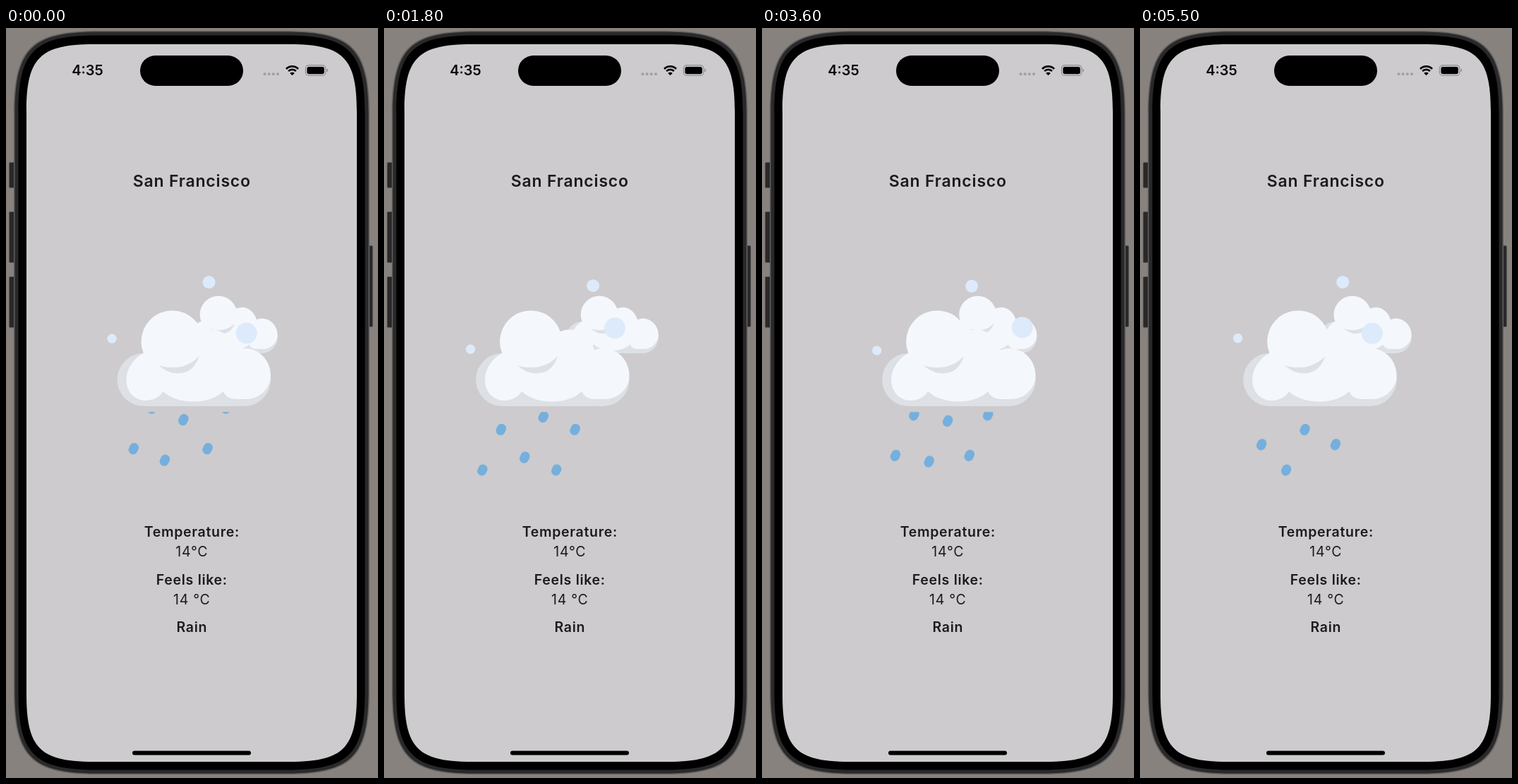
Write an HTML page that moves like this. It is 527 px wide and 1063 px high and loops after 5600 ms.

```html
<!DOCTYPE html>
<html lang="en">
<head>
<meta charset="utf-8">
<title>Weather</title>
<style>
  html, body { margin: 0; width: 100%; height: 100%; overflow: hidden; background: #88827e; }
  svg { display: block; width: 527px; height: 1063px; }
  text { font-family: Inter, "Liberation Sans", sans-serif; font-size: 19.5px; fill: #1c1a1e; text-anchor: middle; letter-spacing: .7px; }
  .b { font-weight: 600; }
  .rain { fill: none; stroke: #75afde; stroke-width: 13; stroke-linecap: round; }
</style>
</head>
<body>
<svg viewBox="0 0 527 1063">
  <defs>
    <clipPath id="below"><rect x="-100" y="544.3" width="500" height="120"/></clipPath>
    <g id="cloud">
      <rect y="461" width="217.5" height="75" rx="37.5" fill="#dde1e5"/>
      <g fill="#f4f8fd">
        <circle cx="78" cy="444.5" r="44"/>
        <path d="M37 461C25 467 13 482 13 499C13 516 25 528 40 528C51 528 60 523 65 515C74 524 90 529.5 108 529.5C126 529.5 141 524 150 515C153 522 160 526 168 526H183C203 526 217.5 509 217.5 493C217.5 471 201 454 180 454C176 454 172 455 168 456.5C163 440 150 427.5 134 427.5C127 427.5 121 429 116 432L78 440Z"/>
      </g>
      <path fill="#dde1e5" d="M59 478C75 484 100 483 116 465C110 484 98 489.5 86 489.5C76 489.5 66 485 59 478Z"/>
    </g>
  </defs>

  <g fill="#29292b" stroke="#5b5856" stroke-width="1">
    <rect x="4.5" y="190.5" width="9" height="36" rx="1.5"/>
    <rect x="4.5" y="260.5" width="9" height="72" rx="1.5"/>
    <rect x="4.5" y="352.5" width="9" height="72" rx="1.5"/>
    <rect x="510" y="308.5" width="9.5" height="115" rx="1.5"/>
  </g>
  <g id="body"></g>

  <rect x="190" y="39" width="146" height="43" rx="21.5"/>
  <rect x="179" y="1024.5" width="168" height="6" rx="3"/>
  <text class="b" x="115.5" y="67" style="font-size:20px;letter-spacing:0;fill:#0a090b">4:35</text>
  <g fill="#a09fa1">
    <circle cx="366.5" cy="65.3" r="2"/><circle cx="372.6" cy="65.3" r="2"/>
    <circle cx="378.8" cy="65.3" r="2"/><circle cx="385" cy="65.3" r="2"/>
  </g>
  <g fill="none" stroke="#050506" stroke-width="2.7">
    <path d="M397 58A12 12 0 0 1 414 58"/>
    <path d="M400.1 61.1A7.6 7.6 0 0 1 410.9 61.1"/>
  </g>
  <path d="M405.5 67.3L402.2 64A4.7 4.7 0 0 1 408.8 64Z"/>
  <rect x="424.4" y="52.9" width="28.4" height="14.4" rx="4.4" fill="none" stroke="#89888a" stroke-width="1.1"/>
  <rect x="426.4" y="54.9" width="24.4" height="10.4" rx="2.8"/>
  <path d="M454.3 57.6Q456 58.4 456 60.1Q456 61.8 454.3 62.6Z" fill="#89888a"/>

  <text class="b" x="263.3" y="225" style="font-size:23px;letter-spacing:.8px">San Francisco</text>
  <text class="b" x="263.3" y="721">Temperature:</text>
  <text x="263.3" y="749">14°C</text>
  <text class="b" x="263.3" y="788.5">Feels like:</text>
  <text x="263.3" y="816.5">14 °C</text>
  <text class="b" x="263.3" y="856">Rain</text>

  <use id="back" href="#cloud"/>
  <g id="front">
    <g clip-path="url(#below)">
      <path id="sides" class="rain"/>
      <path id="middle" class="rain"/>
    </g>
    <use href="#cloud"/>
  </g>
  <g fill="#dceafc">
    <circle id="big" r="15"/>
    <circle id="top" r="9"/>
    <circle id="small" r="6.7"/>
  </g>
</svg>
<script>
const $ = id => document.getElementById(id);
const set = (id, attrs) => { for (const k in attrs) $(id).setAttribute(k, attrs[k]); };
const ease = u => u * u * (3 - 2 * u);

const LOOP = 5600, CYCLE = 5000, START = 300;
const SLOPE = -0.46, STRETCH = Math.hypot(1, SLOPE);
const TOP = 470, END = 628, GAP = 57.5 * STRETCH, DASH = 3.6;

// Rounded box with continuous corners
function squircle(x, y, w, h, r, fill) {
  const e = r * 1.46, c = e * 0.8, k = e - c, m = w - 2 * e, n = h - 2 * e;
  return `<path fill="${fill}" d="M${x + e} ${y}h${m}c${c} 0 ${e} ${k} ${e} ${e}v${n}` +
    `c0 ${c} ${-k} ${e} ${-e} ${e}h${-m}c${-c} 0 ${-e} ${-k} ${-e} ${-e}v${-n}` +
    `c0 ${-c} ${k} ${-e} ${e} ${-e}z"/>`;
}
$('body').innerHTML =
  squircle(11, 4, 504, 1054, 82, '#625f5d') +
  squircle(12.5, 5.5, 501, 1051, 81, '#29292b') +
  squircle(17.5, 10.5, 491, 1041, 76, '#000') +
  squircle(29, 23, 468, 1017, 65.5, '#cdcbcd');

// Slanted rain track that passes through (x, y)
const track = (x, y) =>
  `M${x + SLOPE * (TOP - y)} ${TOP}L${x + SLOPE * (END - y)} ${END}`;
set('sides', { d: track(42, 555.5) + track(146.8, 555.5) });
set('middle', { d: track(93, 557) });
for (const id of ['sides', 'middle']) set(id, { 'stroke-dasharray': `${DASH} ${GAP - DASH}` });

function rain(id, y) {
  const from = (y - TOP) * STRETCH - DASH / 2;
  set(id, { 'stroke-dashoffset': GAP - from % GAP });
}

function draw(t) {
  const tau = (t - START + CYCLE) % CYCLE;

  // slow drift of the back cloud and the balls
  const p = tau < 2450 ? ease(tau / 2450) : 1 - ease((tau - 2450) / 2550);

  // sideways sway of the front cloud
  const s = tau >= 1320 && tau < 3600
    ? ease((tau - 1320) / 2280)
    : 1 - ease(((tau - 3600 + CYCLE) % CYCLE) / 2800);
  const x = 129.3 + 42.9 * s;

  set('front', { transform: `translate(${x} 0)` });
  set('back', { transform: `translate(${254 + 6.5 * p} 139.4) scale(.6)` });
  set('big', { cx: x + 182.3 + 22 * p, cy: 433 - 11.6 * p });
  set('top', { cx: 287 + 13.7 * p, cy: 360 + 7.8 * p });
  set('small', { cx: x - 7.5, cy: 439.3 + 24 * p });
  rain('sides', 567.1 + 0.1163 * tau);
  rain('middle', 536.6 + 0.163 * tau);
}

let begin;
function tick(now) {
  begin ??= now;
  // the picture steps ten times a second
  draw(Math.floor((now - begin + 20) / 100) * 100 % LOOP);
  requestAnimationFrame(tick);
}
draw(0);
requestAnimationFrame(tick);
</script>
</body>
</html>
```
